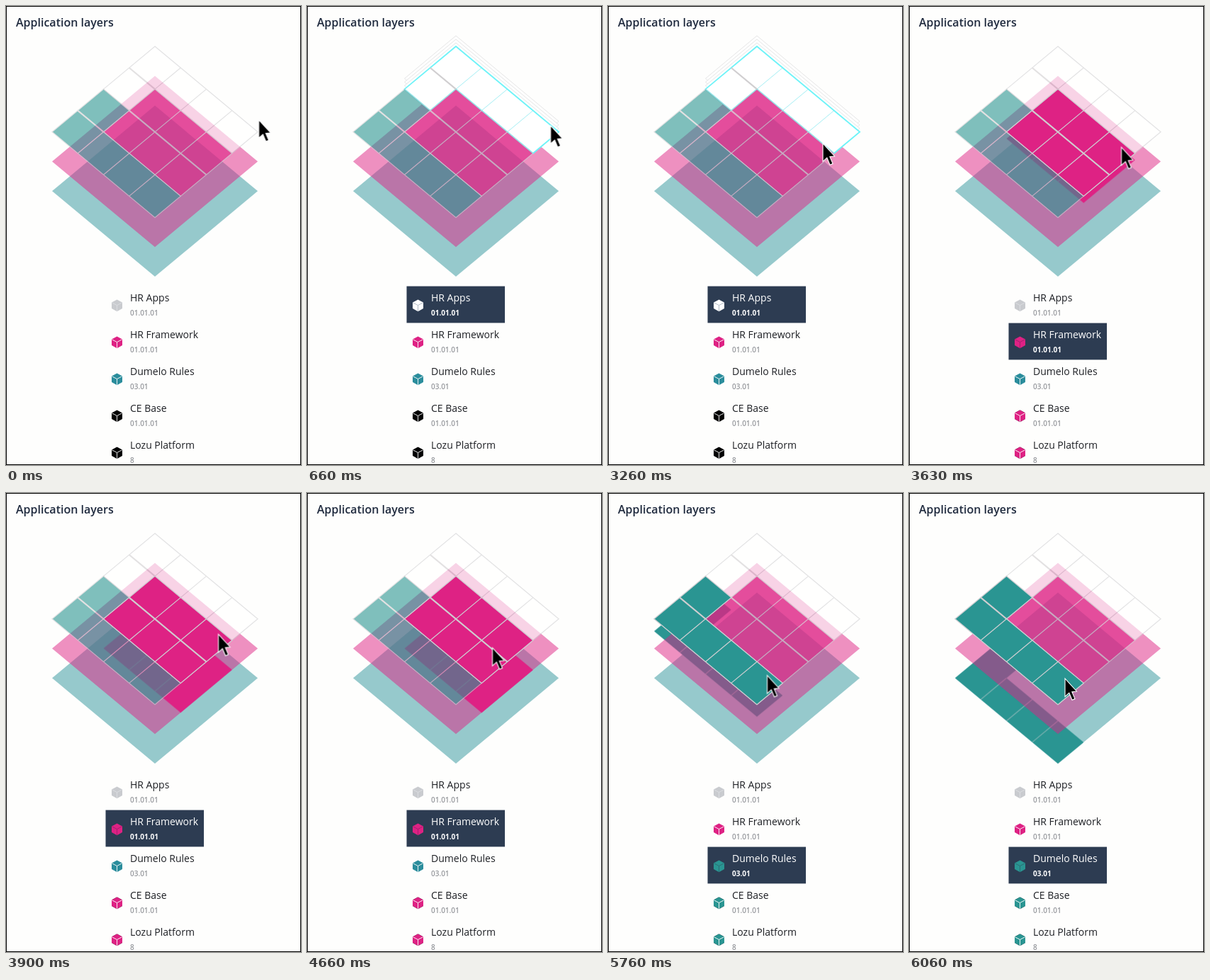
These frames come from a looping animation (416 px wide and 648 px high, 6.6 s). An HTML page:

```html
<!DOCTYPE html>
<html lang="en">
<head>
<meta charset="utf-8">
<title>Application layers</title>
<style>
html, body { margin: 0; width: 100%; height: 100%; overflow: hidden; background: #fefefd; }
svg { display: block; width: 416px; height: 648px; font-family: "Open Sans", sans-serif; }
.title { font-size: 16px; font-weight: 600; fill: #1f2a3e; }
.name { font-size: 14px; fill: #1d1f24; }
.ver { font-size: 10px; font-weight: 600; fill: #96989d; }
.hot .name, .hot .ver { fill: #fff; }
.hot .ver { font-weight: 700; }
.bar { fill: #2d3c52; }
.plane, .copyline { opacity: .5; }
.rest { opacity: .6; }
.thin { fill: none; stroke: #cfcfd2; stroke-width: 1.2; }
.thick { fill: none; stroke: #d0ced0; stroke-width: 2.1; }
.sheet path { fill: #fefefe; stroke: #e2e2e2; stroke-width: .9; }
.glow { fill: none; stroke: #6cf3f8; stroke-width: 1.8; }
.glow.in { stroke: #a4eff4; stroke-width: 1; }

.h1, .h2, .h3, .drop2, .drop3, .sheet, #cursor { animation: 6600ms linear infinite; }
.h1, .h2, .h3 { opacity: 0; animation-timing-function: step-end; }
.h1 { animation-name: h1; }
.h2 { animation-name: h2; }
.h3 { animation-name: h3; }
@keyframes h1 { 0% { opacity: 0 } 3.788% { opacity: 1 } 54.09%, 100% { opacity: 0 } }
@keyframes h2 { 0% { opacity: 0 } 54.09% { opacity: 1 } 86.42%, 100% { opacity: 0 } }
@keyframes h3 { 0% { opacity: 0 } 86.42% { opacity: 1 } 100% { opacity: 1 } }

.drop2 { animation-name: drop2; }
.drop3 { animation-name: drop3; }
.sheet { animation-name: rise; }
@keyframes drop2 {
  0% { transform: translateY(0); }
  54.09% { transform: translateY(0); animation-timing-function: ease; }
  59.55%, 100% { transform: translateY(41.7px); }
}
@keyframes drop3 {
  0% { transform: translateY(0); }
  86.42% { transform: translateY(0); animation-timing-function: ease; }
  91.82%, 100% { transform: translateY(83.5px); }
}
@keyframes rise {
  0% { transform: translateY(0); }
  3.788% { transform: translateY(0); animation-timing-function: ease; }
  9.85%, 100% { transform: translateY(var(--up)); }
}
#cursor { animation-name: cursor; }
@keyframes cursor {
  0%, .4545% { transform: translate(356.5px, 161px); animation-timing-function: ease-out; }
  6.06% { transform: translate(343.5px, 169px); }
  35.3% { transform: translate(343.5px, 169px); animation-timing-function: ease-out; }
  44.85% { transform: translate(308.5px, 188.5px); }
  49.39% { transform: translate(303px, 194px); }
  55% { transform: translate(299.5px, 199.5px); }
  66.67% { transform: translate(299.5px, 199.5px); }
  70.61% { transform: translate(261.5px, 218.5px); }
  76.67% { transform: translate(247.5px, 234.5px); }
  87.27% { transform: translate(224.5px, 257.5px); }
  91.82%, 100% { transform: translate(220px, 262px); }
}
</style>
</head>
<body>
<script>
const PINK = '#de2284', TEAL = '#2a9592';

// Isometric grid: i runs down-right, j runs down-left
const pt = ([i, j]) => `${210 + (i - j) * 36.25} ${57 + (i + j) * 30.2}`;
const line = pts => 'M' + pts.map(pt).join('L');
const area = pts => line(pts) + 'Z';
const path = (d, cls, extra = '') => `<path class="${cls}" d="${d}" ${extra}/>`;
const group = (cls, body, extra = '') => `<g class="${cls}" ${extra}>${body}</g>`;

const parts = [
  { fill: '#fff',
    edge: [[0, 0], [4, 0], [4, 1], [1, 1], [1, 2], [0, 2]],
    thin: [[[1, 0], [1, 1]], [[2, 0], [2, 1]], [[3, 0], [3, 1]]],
    thick: [[0, 1], [1, 1]] },
  { fill: PINK,
    edge: [[1, 1], [4, 1], [4, 3], [1, 3]],
    thin: [[[2, 1], [2, 3]], [[3, 1], [3, 3]]],
    thick: [[1, 2], [4, 2]] },
  { fill: TEAL,
    edge: [[0, 2], [1, 2], [1, 3], [4, 3], [4, 4], [0, 4]],
    thin: [[[1, 3], [1, 4]], [[2, 3], [2, 4]], [[3, 3], [3, 4]]],
    thick: [[0, 3], [1, 3]] }
];
const [white, pink, teal] = parts;
const fillOf = p => path(area(p.edge), '', `fill="${p.fill}"`);
const thinOf = p => p.thin.map(line).join('');
const cells = p => fillOf(p) + path(area(p.edge) + thinOf(p), 'thin') + path(line(p.thick), 'thick');
const rest = p => group('rest', cells(p));
const copy = p => fillOf(p) + group('copyline', path(thinOf(p), 'thin'));

const plane = (dy, fill) => path(area([[0, 0], [4, 0], [4, 4], [0, 4]]), 'plane',
  `fill="${fill}" transform="translate(0 ${dy})"`);

const sheets = [-15, -10, -5].map(up =>
  group('sheet', path(area(white.edge), ''), `style="--up:${up}px"`)).join('');

const glow = path(thinOf(white), 'glow in') + path(area(white.edge), 'glow') + path(line(white.thick), 'thick');

// Lit white cells stay below their neighbours, which cover the inner half of the glow
const stack =
  plane(83.5, '#30969c') +
  group('h2', group('drop2', copy(pink))) +
  group('h3', group('drop3', copy(teal))) +
  plane(41.7, PINK) +
  rest(white) +
  group('h1', sheets + fillOf(white) + glow) +
  rest(pink) + rest(teal) +
  group('h2', cells(pink)) +
  group('h3', cells(teal));

const cube = (fill, edge = '#fff') =>
  `<path d="M156.5 414.5l7.5 4v8.6l-7.5 4.1l-7.5 -4.1v-8.6z" fill="${fill}"/>` +
  `<path d="M149.4 418.8l7.1 3.7l7.1 -3.7M156.5 422.5v8.4" fill="none" stroke="${edge}" stroke-width=".9"/>`;

const label = (name, ver) =>
  `<text class="name" x="175" y="417">${name}</text><text class="ver" x="175" y="437">${ver}</text>`;

const rows = [
  { name: 'HR Apps', ver: '01.01.01', color: '#c9cbcf', edge: '#dddfe2', hot: '#fff', hotEdge: '#a9b3bf' },
  { name: 'HR Framework', ver: '01.01.01', color: PINK, hot: PINK, hotEdge: '#a01f6c' },
  { name: 'Dumelo Rules', ver: '03.01', color: '#2b8d9c', hot: TEAL, hotEdge: '#2b6872' },
  { name: 'CE Base', ver: '01.01.01', color: '#000' },
  { name: 'Lozu Platform', ver: '8', color: '#000' }
];
const list = rows.map((r, n) => {
  const text = label(r.name, r.ver);
  const over = r.hot
    ? group(`hot h${n + 1}`, '<rect class="bar" x="140.5" y="395.6" width="138.5" height="51.8"/>' +
        cube(r.hot, r.hotEdge) + text)
    : group('h2', cube(PINK)) + group('h3', cube(TEAL));
  return group('row', cube(r.color, r.edge) + text + over, `transform="translate(0 ${n * 52})"`);
}).join('');

const arrow = '<path id="cursor" d="M0 0V25.5L5.8 20.2L10 30.3L14 28.6L9.8 18.8L16.5 18Z" ' +
  'fill="#000" stroke="#fff" stroke-width="1.1"/>';

document.body.innerHTML = `<svg viewBox="0 0 416 648" width="416" height="648">
  <rect width="416" height="648" fill="#fefefd"/>
  <text class="title" x="14" y="29">Application layers</text>
  ${stack}${list}${arrow}
  <rect x=".5" y=".5" width="415" height="647" fill="none" stroke="#000"/>
</svg>`;
</script>
</body>
</html>
```
